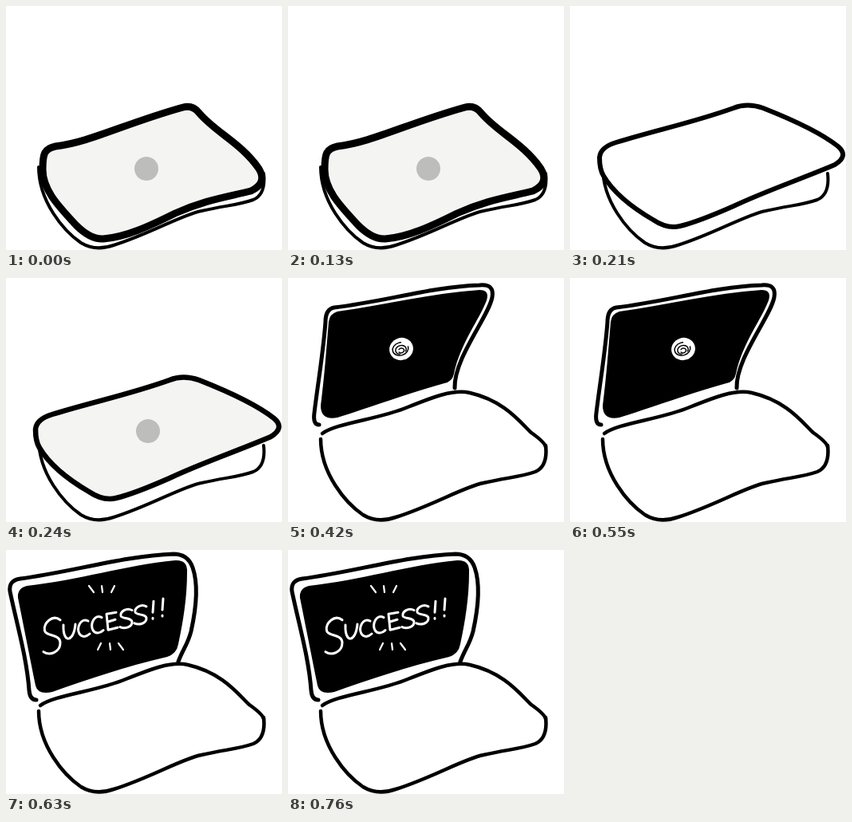
An HTML page with a canvas for the animation above (840 ms loop, 346x306 px).

```html
<!DOCTYPE html>
<html lang="en">
<head>
<meta charset="utf-8">
<title>Laptop opening</title>
<style>
  html, body { margin: 0; overflow: hidden; background: #fff; }
  canvas { display: block; }
</style>
</head>
<body>
<canvas id="stage" width="346" height="306" role="img" aria-label="A laptop opens: Success!!"></canvas>
<script>
const ctx = document.getElementById('stage').getContext('2d');
ctx.lineCap = ctx.lineJoin = 'round';

function fill(path, color) {
  ctx.fillStyle = color;
  ctx.fill(path);
}
function stroke(path, width, color = '#000') {
  ctx.lineWidth = width;
  ctx.strokeStyle = color;
  ctx.stroke(path);
}
function ellipse(x, y, rx, ry, start = 0, end = 7) {
  const path = new Path2D();
  path.ellipse(x, y, rx, ry, -0.3, start, end);
  return path;
}

const LID = '#f4f4f3', MARK = '#bdbdbc';

// The lower edge of the base is visible in every pose
const base = new Path2D('M41 202C41 245 72 282 94 297Q112 308 135 300C180 286 220 262 245 257C275 250 290 250 310 243Q326 236 323 210');
const baseTop = new Path2D('M43 195C60 182 115 177 150 162C180 150 207 139 228 144C272 154 292 182 305 194Q322 206 323 212');

const closedLid = new Path2D('M46 205C46 185 48 179 62 176C105 171 150 147 222 127Q234 124 242 134C262 158 295 172 317 204Q328 222 307 232C275 240 250 243 212 260C180 276 150 290 122 292Q106 293 88 275C68 253 46 232 46 205Z');
const liftedLid = new Path2D('M37 190Q38 177 58 171C110 155 155 146 205 128Q222 121 242 128C275 141 312 157 336 176Q350 188 332 199C290 217 245 232 205 251C180 262 155 272 138 276Q122 280 104 268C80 254 55 235 42 213Q37 205 37 190Z');

const tilted = {
  frame: new Path2D('M39 184Q31 184 33 169C38 128 44 95 47 55Q47 39 58 37C120 30 180 11 240 9Q259 7 256 24C252 48 208 100 209 138'),
  screen: new Path2D('M41 160C46 120 48 90 51 55Q52 45 62 42C120 34 180 19 240 15Q253 15 249 28C240 52 216 82 208 120Q206 130 196 132C140 148 95 165 62 175Q41 179 41 160Z')
};
const upright = {
  frame: new Path2D('M38 188Q30 188 29 176C26 135 14 95 5 52Q3 38 18 36C80 28 150 7 210 5Q228 5 234 22C242 45 238 75 232 102C228 118 222 124 216 140'),
  screen: new Path2D('M37 170C30 135 22 95 15 60Q14 48 26 45C90 38 150 19 212 13Q228 12 227 28C227 60 222 90 216 118Q214 130 202 134C150 146 100 163 58 178Q40 182 37 170Z')
};

// Handwritten letters: advance width and pen stroke
const glyphs = {
  S: [18, 'M15 2C8-2 0 4 1 9C2 13 15 11 15 17C15 23 6 26 0 23'],
  U: [19, 'M0 2C-1 26 13 24 15 1'],
  C: [17, 'M12 2C3-3-3 10 1 18C4 23 10 22 14 18'],
  E: [18, 'M13 0L1 2L3 22L15 19M2 12L12 9'],
  '!': [12, 'M6 0L5 14M5 21v1']
};

// A tall initial, then letters climbing along a slope
function handwriting(text) {
  const word = new Path2D();
  let x = 72;
  [...text].forEach((letter, i) => {
    const [advance, pen] = glyphs[letter];
    if (i === 0) {
      word.addPath(new Path2D(pen), new DOMMatrix([1.4, 0, 0, 1.9, 47, 84]));
      return;
    }
    word.addPath(new Path2D(pen), new DOMMatrix([1, 0, 0, 1, x, 92 - (x - 72) * 0.26]));
    x += advance;
  });
  return word;
}
const word = handwriting('SUCCESS!!');

// Three short rays spreading away from the word
const sparks = new Path2D();
for (const [x, y, dir] of [[121, 53, -1], [130, 117, 1]]) {
  for (const k of [-1, 0, 1]) {
    sparks.moveTo(x + 11 * k, y);
    sparks.lineTo(x + 16 * k + dir, y + 8 * dir);
  }
}

function drawLid(lid, width, markX, markY) {
  stroke(base, 4);
  fill(lid, markX ? LID : '#fff');
  stroke(lid, width);
  if (markX) fill(ellipse(markX, markY, 15, 15), MARK);
}

function drawOpen(pose) {
  stroke(base, 4.5);
  stroke(baseTop, 4.5);
  stroke(pose.frame, 5);
  fill(pose.screen, '#000');
}

function drawScribble(x, y) {
  fill(ellipse(x, y, 15, 14), '#fff');
  for (let i = 0; i < 3; i++) {
    const r = 10 - 3.2 * i;
    stroke(ellipse(x - 1 + i * 0.5, y + i, r, r * 0.8, i * 2, i * 2 + 5), 1.5);
  }
}

function draw() {
  const t = performance.now() % 840;
  ctx.fillStyle = '#fff';
  ctx.fillRect(0, 0, 346, 306);
  if (t < 210) drawLid(closedLid, 9, 176, 204);
  else if (t < 240) drawLid(liftedLid, 6);
  else if (t < 420) drawLid(liftedLid, 6.5, 178, 192);
  else if (t < 630) {
    drawOpen(tilted);
    drawScribble(142, 89);
  } else {
    drawOpen(upright);
    stroke(word, 3, '#fff');
    stroke(sparks, 2.2, '#fff');
  }
  requestAnimationFrame(draw);
}
draw();
</script>
</body>
</html>
```
